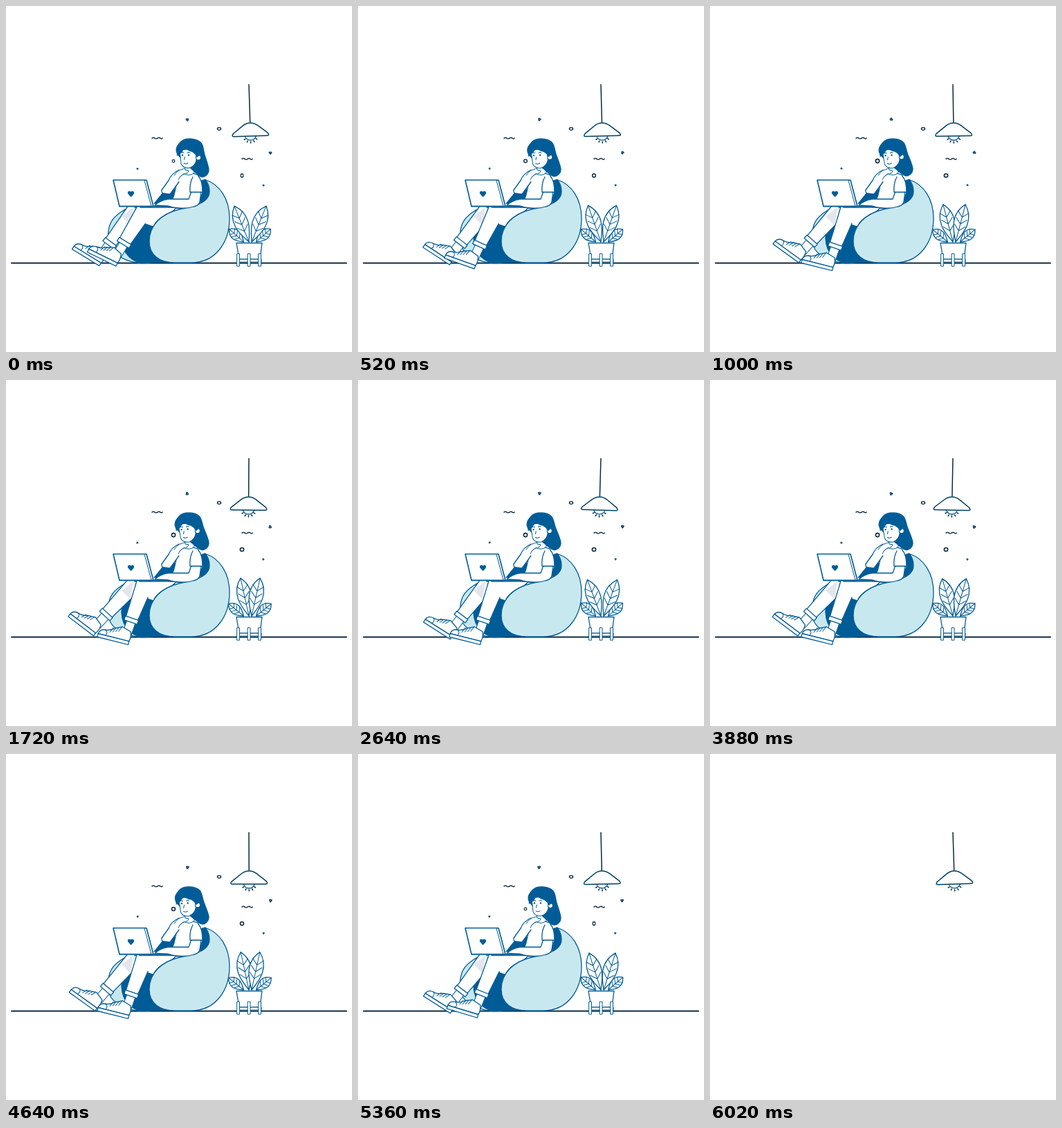
An HTML page that plays this animation: 500 by 500 pixels, repeating every 6040 ms.

```html
<!DOCTYPE html>
<html lang="en">
<head>
<meta charset="utf-8">
<title>Thinking on a beanbag</title>
<style>
  html, body { margin: 0; width: 100%; height: 100%; overflow: hidden; background: #fff; }
  svg { display: block; width: 100%; height: 100%; }
  .line { fill: none; }
  .dark { fill: #005c97; }
  .pale { fill: #c8e8f0; }
  .bare { stroke: none; }
  .thin { stroke-width: 1; }
  .ink { stroke: #0a2a42; stroke-width: 1.5; }
</style>
</head>
<body>
<svg id="stage" viewBox="0 0 500 500" fill="#fff" stroke="#005c97" stroke-width="1.3" stroke-linejoin="round" stroke-linecap="round"></svg>
<script>
const LOOP = 6040, LAST = 6020, TAU = 2 * Math.PI;
const stage = document.getElementById('stage');

function add(parent, tag, attrs = {}) {
  const el = document.createElementNS('http://www.w3.org/2000/svg', tag);
  for (const k in attrs) el.setAttribute(k, attrs[k]);
  return parent.appendChild(el);
}
const group = parent => add(parent, 'g');
const path = (parent, d, cls = '') => add(parent, 'path', { d, class: cls });
const box = (parent, x, y, width, height, cls = '') =>
  add(parent, 'rect', { x, y, width, height, class: cls });
const dot = (parent, cx, cy, r, cls = '') => add(parent, 'circle', { cx, cy, r, class: cls });
const turn = (el, deg, x, y) => el.setAttribute('transform', `rotate(${deg} ${x} ${y})`);
const place = (el, x, y, deg = 0, sx = 1, sy = sx) =>
  el.setAttribute('transform', `translate(${x} ${y}) rotate(${deg}) scale(${sx} ${sy})`);

// Closed smooth curve through a few points
function blob(parent, pts, cls) {
  const n = pts.length, at = i => pts[(i + n) % n];
  const ctrl = (i, s) => at(i).map((v, k) => v + s * (at(i + 1)[k] - at(i - 1)[k]) / 6);
  let d = `M${pts[0]}`;
  for (let i = 0; i < n; i++) d += `C${ctrl(i, 1)} ${ctrl(i + 1, -1)} ${at(i + 1)}`;
  return path(parent, d + 'Z', cls);
}

// Shoe with its toe at the origin, pointing left
function shoe(parent) {
  const g = group(parent);
  path(g, 'M0 0Q1 -8 11 -8Q17 -9 21 -13L32 -18L45 -14Q48 -6 46 0Z');
  path(g, 'M9 -8Q14 -5 11 0', 'line thin');
  for (let i = 0; i < 4; i++)
    path(g, `M${16 + 4 * i} ${-6 - 1.5 * i}l3 -7`, 'line thin');
  box(g, 0, 0, 46, 5);
  return g;
}

// Lower leg hanging down from a knee at the origin
function leg(parent, len) {
  const g = group(parent);
  box(g, -6, len, 13, 22, 'thin');
  place(shoe(g), -39, len + 36, -5);
  path(g, `M-11 -4L-9 ${len}H9L12 16`);
  box(g, -10, len - 1, 20, 6);
  return g;
}

// Leaf growing up from its base, broad above the middle
function leaf(parent, len, w) {
  const g = group(parent);
  const half = s => `C${s * w * .5} ${-len * .2} ${s * w * 2} ${-len * .62} 0 ${-len}`;
  path(g, `M0 0${half(-1)}M0 0${half(1)}`);
  let veins = `M0 0V${-len}`;
  for (let p = .3; p < .7; p += .18)
    for (const s of [-1, 1]) veins += `M0 ${-len * p}L${s * w * .8} ${-len * (p + .14)}`;
  path(g, veins, 'line thin');
  return g;
}

const scene = group(stage);
path(scene, 'M8 371.5H492', 'ink').style.strokeWidth = 2;

// Beanbag, back
blob(scene, [[186, 289], [152, 312], [152, 352], [190, 371], [230, 360], [220, 300]], 'pale');
path(scene, 'M168 318Q160 358 190 371H245L214 300Z', 'dark bare');
path(scene, 'M213 286L226 270L288 250Q300 266 288 284Z', 'dark bare');

// Torso and far arm
path(scene, 'M256 243Q267 240 277 244Q284 254 284 270L276 292H234Q245 276 247 250Z');
path(scene, 'M250 237Q239 242 235 252L225 266Q224 271 229 271L237 272L250 254');
path(scene, 'M260 230L257 242Q265 247 272 241V228', 'thin');

const head = group(scene);
blob(head, [[247, 212], [253, 196], [267, 192], [282, 198], [287, 215], [293, 238], [284, 247], [272, 239]], 'dark');
path(head, 'M251 208L253 228Q256 235 265 234Q273 231 275 223L274 206Z', 'thin');
dot(head, 278, 219, 3.5, 'thin');
path(head, 'M247 217Q244 193 267 193Q284 195 282 214L276 219Q274 214 269 211Q261 209 258 204Q257 211 247 217Z', 'dark bare');
for (const x of [255, 264]) {
  dot(head, x, 215.5, 1.2, 'dark bare');
  path(head, `M${x - 2} 212q2 -1 4 0`, 'line thin');
}
path(head, 'M258.500 218l-1 4M257 227q3 2 6 0', 'line thin');
path(scene, 'M243 245Q248 237 255 236Q259 233 259 237L264 238Q264 242 256 243Q251 246 249 251', 'thin');

// Legs
const farLeg = leg(scene, 64);
path(scene, 'M167 304L184 291L180 317Z', 'bare').style.fill = '#e5e6ed';
path(scene, 'M186 291H247L238 299Q218 306 213 319L199 314');
const nearLeg = leg(scene, 53);

// Beanbag, front
path(scene, 'M288 251C309 258 323 279 323 307C323 339 305 371 267 371H244C222 371 207 360 207 340C207 317 225 300 250 294C270 290 294 285 294 268Q294 258 288 251Z', 'pale');

// Near arm
path(scene, 'M268 268L264 279H234Q222 281 215 288L233 289Q255 295 271 290Q279 288 280 283L282 268');
path(scene, 'M270 247Q265 256 266 269H284Q284 252 278 246');

// Laptop
const laptop = group(scene);
laptop.setAttribute('stroke-width', 1.6);
path(laptop, 'M155 251.5H203L213 289.5H164Z');
path(laptop, 'M200 252L210 289', 'line thin');
path(laptop, 'M164 289.5H237');

const HEART = 'M0 5L-4 .5Q-5 -4 0 -2Q5 -4 4 .5Z';
place(path(laptop, HEART, 'dark thin'), 180.5, 270.5);

// Plant in a pot on a three-legged stand
const plant = group(scene);
const leaves = [];
for (const s of [-1, 1]) {
  leaves.push({ el: leaf(plant, 28, 7), x: 352.5 + 9 * s, y: 341, rest: 51 * s, spread: -3 * s });
  leaves.push({ el: leaf(plant, 56, 10), x: 353 + 2 * s, y: 341, rest: 12 * s, spread: 10 * s });
}
path(plant, 'M333 342.5H370L367 366H337Z');
box(plant, 335, 366, 34, 4, 'thin');
for (let i = 0; i < 3; i++) box(plant, 334 + 15.5 * i, 358, 3.5, 18, 'thin');

// Floating bits
const bits = group(scene);
const hearts = [[262, 164, .5], [382, 212, .5], [190, 235, .32], [372, 259, .32]]
  .map(([x, y, s]) => ({ x, y, s, el: path(bits, HEART, 'dark ink') }));
const rings = [[308, 177.5], [242, 224], [341, 245]]
  .map(([x, y]) => ({ x, y, el: dot(bits, x, y, 2.5, 'ink') }));
rings.forEach(r => { r.el.setAttribute('cx', 0); r.el.setAttribute('cy', 0); });
for (const [x, y] of [[211, 191], [341, 221]])
  path(bits, `M${x} ${y}q2 -1.500 4 0t4 0t4 0t3 0`, 'line ink');

// Lamp
const lamp = group(stage);
path(lamp, 'M351 113.5V168', 'ink');
path(lamp, 'M343 187a8 7 0 0 0 16 0');
path(lamp, 'M351 169Q345 169 340 173L326 184Q323 188 327 188H375Q379 188 376 184L362 173Q357 169 351 169Z', 'ink').style.stroke = '#003f66';
for (let a = -1; a <= 1; a += .5) {
  const x = Math.sin(a), y = Math.cos(a);
  path(lamp, `M${351 + 9 * x} ${187 + 9 * y}l${2 * x} ${2 * y}`, 'line ink');
}

const ease = p => (1 - Math.cos(Math.PI * Math.min(1, Math.max(0, p)))) / 2;
// Rises at the loop start and falls over the same span up to `end`
const hold = (t, end, span) => ease(t / span) * ease((end - t) / span);

function draw(t) {
  scene.style.display = t >= LAST ? 'none' : '';
  const a = TAU * t / LOOP;
  turn(lamp, -1.8 * Math.cos(a), 351, 113);

  const nod = hold(t, 5300, 900);
  turn(head, -4 * nod, 264, 236);

  // The second kick comes a little early
  const kick = Math.sin(a + .15 * Math.PI * Math.max(0, -Math.sin(a))) ** 2;
  place(farLeg, 189, 290, 36.5 + 6 * kick);
  place(nearLeg, 199, 295, 31 - 12 * hold(t, LOOP, 1000));

  const open = (1 + Math.cos(2 * a)) / 2;
  for (const f of leaves) place(f.el, f.x, f.y, f.rest + f.spread * open);
  for (const h of hearts) place(h.el, h.x, h.y, -3 * 360 * t / LOOP, h.s);

  const grow = .75 + .3 * nod;
  rings.forEach((r, i) => place(r.el, r.x, r.y, 0, i ? grow : 1, i === 1 ? grow : i ? 1 : .75));
}

const start = performance.now();
function tick(now) {
  draw(Math.max(0, now - start) % LOOP);
  requestAnimationFrame(tick);
}
draw(0);
requestAnimationFrame(tick);
</script>
</body>
</html>
```
